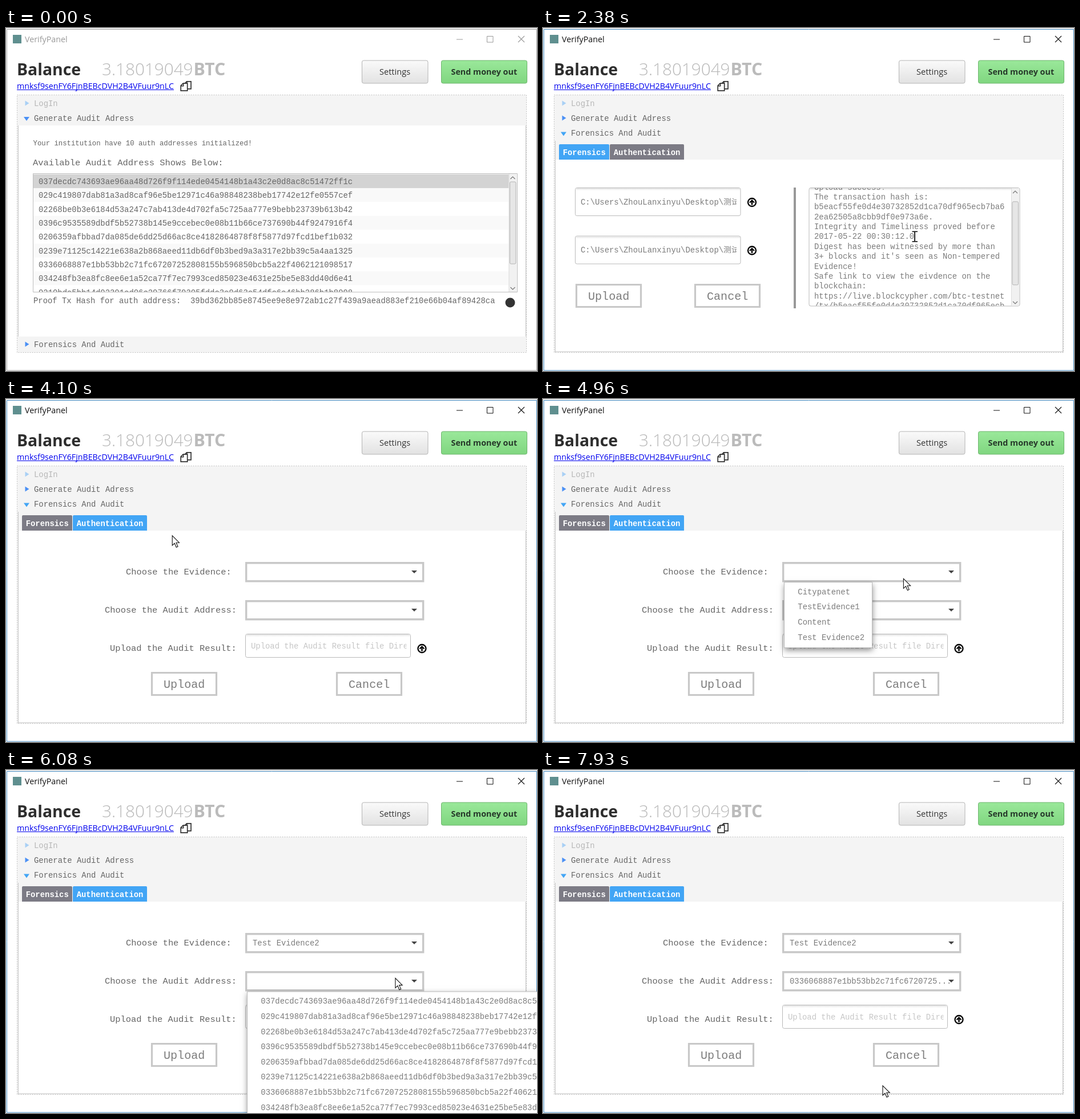
These frames come from a looping animation (930 px wide and 602 px high, 8000 ms). An HTML page with a canvas:

```html
<!DOCTYPE html>
<html lang="en">
<head>
<meta charset="utf-8">
<title>Wallet audit demo</title>
<style>
  html, body { margin: 0; width: 100%; height: 100%; overflow: hidden; background: #fff; }
  canvas { display: block; }
</style>
</head>
<body>
<canvas id="stage" width="930" height="602"></canvas>
<script>
const ctx = document.getElementById('stage').getContext('2d');
const LOOP = 8000;
const MONO = '"Liberation Mono", monospace';
const SANS = '"Open Sans", "Noto Sans", sans-serif';
const BLUE = '#42a5f5', ACCENT = '#0096c9', GREY = '#c8c8c8';
const INK = '#666', SOFT = '#7c7c7c', HINT = '#c6c6c6';
const PATH = 'C:\\Users\\ZhouLanxinyu\\Desktop\\测试文件';
const ADDRESSES = [
  '037decdc743693ae96aa48d726f9f114ede0454148b1a43c2e0d8ac8c51472ff1c',
  '029c419807dab81a3ad8caf96e5be12971c46a98848238beb17742e12fe0557cef',
  '02268be0b3e6184d53a247c7ab413de4d702fa5c725aa777e9bebb23739b613b42',
  '0396c9535589dbdf5b52738b145e9ccebec0e08b11b66ce737690b44f9247916f4',
  '0206359afbbad7da085de6dd25d66ac8ce4182864878f8f5877d97fcd1bef1b032',
  '0239e71125c14221e638a2b868aeed11db6df0b3bed9a3a317e2bb39c5a4aa1325',
  '0336068887e1bb53bb2c71fc67207252808155b596850bcb5a22f4062121098517',
  '034248fb3ea8fc8ee6e1a52ca77f7ec7993ced85023e4631e25be5e83dd40d6e41',
  '0210bda5bb14d02301cd06c29766f79305fddc3e9d63c54dfc6c46bb286b1b8998'
];
const EVIDENCE = ['Citypatenet', 'TestEvidence1', 'Content', 'Test Evidence2'];
const RESULT = [
  'Upload success!', 'The transaction hash is:',
  'b5eacf55fe0d4e30732852d1ca70df965ecb7ba6', '2ea62505a8cbb9df0e973a6e.',
  'Integrity and Timeliness proved before', '2017-05-22 00:30:12.0',
  'Digest has been witnessed by more than', "3+ blocks and it's seen as Non-tempered", 'Evidence!',
  'Safe link to view the eivdence on the', 'blockchain:',
  'https://live.blockcypher.com/btc-testnet', '/tx/b5eacf55fe0d4e30732852d1ca70df965ecb',
  '7ba62ea62505a8cbb9df0e973a6e'
];

// Event times in ms
const T = {
  focus: 100, expand: 320, expanded: 760, upload: 1560, scroll: 2230, scrolled: 2690,
  authTab: 3760, openEvidence: 4650, pickEvidence: 5450, openAddress: 6040, pickAddress: 7690
};
// Cursor path: time, x, y
const CURSOR = [
  [100, 120, 596], [300, 96, 556], [430, 94, 556], [870, 100, 476], [1390, 119, 465], [1560, 119, 465],
  [1740, 382, 462], [2070, 694, 388], [2290, 651, 366], [2900, 651, 366], [3110, 460, 416],
  [3320, 200, 398], [3440, 200, 398], [3720, 178, 222], [3980, 178, 222], [4540, 702, 305], [4660, 690, 304],
  [4760, 637, 307], [4960, 632, 315], [5080, 560, 362], [5330, 530, 417], [5450, 530, 417],
  [5960, 690, 367], [6080, 682, 365], [6750, 630, 612], [7180, 610, 612], [7470, 597, 566],
  [7650, 597, 566], [7930, 595, 554], [8000, 595, 554]
];

const clamp = v => Math.max(0, Math.min(1, v));
const progress = (t, a, b) => clamp((t - a) / (b - a));
const ease = p => p * p * (3 - 2 * p);

function cursorAt(t) {
  const i = CURSOR.findIndex(k => k[0] > t);
  if (i < 1) return { x: -50, y: -50 };
  const [t0, x0, y0] = CURSOR[i - 1], [t1, x1, y1] = CURSOR[i];
  const p = progress(t, t0, t1);
  return { x: x0 + (x1 - x0) * p, y: y0 + (y1 - y0) * p };
}

function text(str, x, y, size = 13.9, color = INK, weight = 400, family = MONO) {
  ctx.font = `${weight} ${size}px ${family}`;
  ctx.fillStyle = color;
  ctx.fillText(str, x, y);
}

function fill(x, y, w, h, color) {
  ctx.fillStyle = color;
  ctx.fillRect(x, y, w, h);
}

function box(x, y, w, h, radius, paint, stroke, width = 1) {
  ctx.beginPath();
  ctx.roundRect(x, y, w, h, radius);
  if (paint) { ctx.fillStyle = paint; ctx.fill(); }
  if (stroke) { ctx.strokeStyle = stroke; ctx.lineWidth = width; ctx.stroke(); }
}

function shape(points, paint, stroke, width = 1, closed = true) {
  ctx.beginPath();
  points.forEach(([x, y]) => ctx.lineTo(x, y));
  if (closed) ctx.closePath();
  if (paint) { ctx.fillStyle = paint; ctx.fill(); }
  if (stroke) { ctx.strokeStyle = stroke; ctx.lineWidth = width; ctx.stroke(); }
}

function clipped(x, y, w, h, draw) {
  ctx.save();
  ctx.beginPath();
  ctx.rect(x, y, w, h);
  ctx.clip();
  draw();
  ctx.restore();
}

function gradient(y0, y1, from, to) {
  const g = ctx.createLinearGradient(0, y0, 0, y1);
  g.addColorStop(0, from);
  g.addColorStop(1, to);
  return g;
}

function field(x, y, w, h) {
  box(x, y, w, h, 3, '#fff', '#bababa');
  fill(x + 1, y + .5, w - 2, 4, gradient(y, y + 5, '#dedede', '#ffffff'));
}

function textField(y, w, str, x = 56.5, h = 49, color = SOFT) {
  field(x, y, w, h);
  clipped(x + 8, y, w - 15, h, () => text(str, x + 9.5, y + h / 2 + 4.5, 13.9, color));
}

function button(label, x, y) {
  box(x + 1.5, y + 1.5, 113, 39, 0, '#fff', GREY, 3.2);
  text(label, x + 22, y + 28, 20.1, SOFT);
}

function combo(y, value) {
  box(420.7, y + 1.7, 310, 32, 0, '#fff', GREY, 3.4);
  text(value, 432, y + 22, 13.9, SOFT);
  shape([[710, y + 15], [720, y + 15], [715, y + 20]], '#444');
}

function uploadIcon(x, y) {
  ctx.beginPath();
  ctx.arc(x, y, 7, 0, Math.PI * 2);
  ctx.strokeStyle = '#000';
  ctx.lineWidth = 2.3;
  ctx.stroke();
  shape([[x - 4, y + .5], [x, y - 3.5], [x + 4, y + .5]], null, '#000', 2.2, false);
  shape([[x, y - 3], [x, y + 4.5]], null, '#000', 2.5, false);
}

function scrollbar(x, top, bottom, thumbTop, thumbBottom) {
  fill(x - 7, top, 14, bottom - top, '#f1f1f1');
  fill(x - 7, top, 1, bottom - top, '#dcdcdc');
  const arrow = (y, d) => shape([[x - 4, y + d], [x, y - d], [x + 4, y + d]], null, '#777', 1.2, false);
  arrow(top + 7, 2);
  arrow(bottom - 6, -2);
  box(x - 5, thumbTop, 10.5, thumbBottom - thumbTop, 2, '#e6e6e6', '#b4b4b4');
}

function popup(items, x, y, w, h, mouse) {
  ctx.save();
  ctx.shadowColor = 'rgba(0,0,0,.45)';
  ctx.shadowBlur = 10;
  ctx.shadowOffsetY = 4;
  box(x + .5, y + .5, w, h, 0, '#fff');
  ctx.restore();
  box(x + .5, y + .5, w, h, 0, null, '#b8b8b8');
  items.forEach((item, i) => {
    const top = y + 4 + i * 26.63;
    const hover = mouse.x > x && mouse.x < x + w && mouse.y >= top && mouse.y < top + 26.63;
    if (hover) fill(x + 1, top, w - 1, 26.63, ACCENT);
    text(item, x + 24.3, top + 17.8, 13.9, hover ? '#fff' : SOFT);
  });
}

function windowFrame(active) {
  fill(0, 0, 930, 602, '#fff');
  fill(0, 0, 930, 2, '#ececec');
  box(1.5, 2.5, 928, 598.5, 0, '#fff', active ? '#4a90c6' : '#a5a5a5');
  const ink = active ? '#111' : '#999';
  fill(12, 12, 15, 15, '#5f8f8f');
  text('VerifyPanel', 33, 24.5, 14.3, ink, 400, SANS);
  fill(789, 19.5, 11, 1, ink);
  box(842.5, 14.5, 10.5, 10.5, 0, null, ink);
  shape([[897, 14], [908, 25]], null, ink, 1.1, false);
  shape([[908, 14], [897, 25]], null, ink, 1.1, false);
}

function copyIcon() {
  const page = (x, y) => {
    shape([[x + 4, y], [x + 11.5, y], [x + 11.5, y + 13], [x, y + 13], [x, y + 4]], '#fff', '#333', 1.7);
    shape([[x + 4.5, y], [x + 4.5, y + 4.5], [x, y + 4.5]], null, '#333', 1.5, false);
  };
  page(312.5, 93.8);
  page(306.2, 97.2);
}

function header() {
  text('Balance', 19, 83, 28.4, '#2e2e2e', 700, SANS);
  text('3.18019049', 168, 83, 29.7, '#b8b8b8', 300, SANS);
  text('BTC', 328.5, 83, 30.3, '#bbb', 700, SANS);
  text('mnksf9senFY6FjnBEBcDVH2B4VFuur9nLC', 19, 106.5, 14.2, '#0000ee', 400, SANS);
  fill(19, 108, 275, 1, '#0000ee');
  copyIcon();
  box(623.5, 57, 115.5, 40, 3, gradient(57, 97, '#fafafa', '#e2e2e2'), '#b4b4b4');
  text('Settings', 654, 82, 14.6, '#333', 400, SANS);
  box(762.5, 57, 150, 40, 3, gradient(57, 97, '#9ae89a', '#80d680'), '#6fb56f');
  text('Send money out', 779.5, 82, 14.35, '#26382a', 700, SANS);
}

function sectionTitle(label, y, open, color = INK, arrow = '#4a90f5', glow = false) {
  text(label, 49, y + 4.5, 13.9, color);
  ctx.save();
  if (glow) { ctx.shadowColor = '#1e90ff'; ctx.shadowBlur = 7; }
  shape(open ? [[31, y - 2], [41, y - 2], [36, y + 5]] : [[33.5, y - 4.5], [40.5, y], [33.5, y + 4.5]], arrow);
  ctx.restore();
}

function addressPage() {
  fill(21, 171, 890, 371, '#fff');
  text('Your institution have 10 auth addresses initialized!', 47.5, 205.5, 12.3);
  text('Available Audit Address Shows Below:', 47, 241, 15.45);
  clipped(47, 255, 849, 209, () => {
    ADDRESSES.forEach((address, i) => {
      const top = 256.8 + i * 24.35;
      fill(48, top, 833, 24.35, i === 0 ? '#d3d3d3' : i % 2 ? '#f9f9f9' : '#fff');
      text(address, 57, top + 17);
    });
  });
  scrollbar(887.5, 256, 463, 270, 414);
  box(47.5, 255.5, 848, 208, 0, null, '#bdbdbd');
  text('Proof Tx Hash for auth address:', 48, 483);
  text('39bd362bb85e8745ee9e8e972ab1c27f439a9aead883ef210e66b04af89428ca', 323, 483);
  ctx.beginPath();
  ctx.arc(883, 482, 8.5, 0, Math.PI * 2);
  ctx.fillStyle = '#333';
  ctx.fill();
}

function tab(label, x, w, selected) {
  box(x, 204, w, 27, [2, 2, 0, 0], selected ? BLUE : '#7c7b85');
  text(label, x + 6.7, 222.6, 13.9, '#fff', 700);
}

function forensicsPage(t) {
  textField(280.5, 289.5, PATH);
  uploadIcon(366, 306);
  textField(365, 289.5, PATH);
  uploadIcon(366, 390.5);
  button('Upload', 57, 449);
  button('Cancel', 265, 449);
  fill(439, 280, 4, 212, '#999');
  field(466, 280.5, 369, 207.5);
  if (t < T.upload) return text('The result will be shown here!', 475, 298, 13.9, HINT);
  const scroll = progress(t, T.scroll, T.scrolled);
  clipped(467, 281, 367, 206.5, () => {
    RESULT.forEach((line, i) => text(line, 475, 298 + i * 17.36 - scroll * 43.8, 13.9, SOFT));
    scrollbar(827, 281, 488, 294 + scroll * 33, 440 + scroll * 33);
  });
}

function authenticationPage(t) {
  text('Choose the Evidence:', 210, 308, 15.4);
  text('Choose the Audit Address:', 173, 375, 15.4);
  text('Upload the Audit Result:', 182, 442, 15.4);
  combo(286, t < T.pickEvidence ? '' : EVIDENCE[3]);
  combo(353, t < T.pickAddress ? '' : ADDRESSES[6].slice(0, 31) + '...');
  textField(412.5, 289, 'Upload the Audit Result file Directory', 419.5, 41, HINT);
  uploadIcon(728.5, 438);
  button('Upload', 254, 479);
  button('Cancel', 578, 479);
}

function accordion(t) {
  const shift = 370.5 * (1 - ease(progress(t, T.expand, T.expanded)));
  const opening = t >= T.expand;
  fill(20, 118, 891, 451, '#f4f4f4');
  sectionTitle('LogIn', 132, false, '#b8b8b8', '#a9d0f5');
  sectionTitle('Generate Audit Adress', 158, !opening);
  if (shift > 0) clipped(20, 171, 892, shift, addressPage);
  sectionTitle('Forensics And Audit', 184.5 + shift, opening, INK, opening ? BLUE : '#4a90f5', opening && t < T.upload);

  clipped(20, 198 + shift, 892, Math.max(0, 371 - shift), () => {
    ctx.translate(0, shift);
    const auth = t >= T.authTab;
    fill(21, 231, 890, 340, '#fff');
    tab('Forensics', 28, 88, !auth);
    tab('Authentication', 117, 130, auth);
    (auth ? authenticationPage : forensicsPage)(t);
  });

  fill(21, shift > 0 ? 171 : 198, 1, shift > 0 ? shift : 371, '#c4c4c4');
  fill(910, shift > 0 ? 171 : 231, 1, shift > 0 ? shift : 338, '#c4c4c4');
  if (shift === 0) fill(21, 567.5, 890, 1, '#c4c4c4');
  ctx.setLineDash([2, 2]);
  box(19.5, 117.5, 892, 452, 0, null, '#bcbcbc');
  ctx.setLineDash([]);
}

function drawCursor(t, { x, y }) {
  const within = (l, top, r, b) => x > l && x < r && y > top && y < b;
  const overText = t > T.expanded && t < T.authTab &&
    (within(57, 281, 346, 329) || within(57, 365, 346, 414) || within(467, 281, 820, 488));
  if (overText) {
    fill(x - .8, y - 9, 1.8, 18, '#111');
    for (const end of [-9.5, 8]) fill(x - 4.5, y + end, 9.5, 1.6, '#111');
    return;
  }
  const outline = [[0, 0], [0, 17], [4, 13.3], [7, 20.3], [9.8, 19], [6.8, 12.3], [12.2, 12.3]];
  shape(outline.map(([dx, dy]) => [x + dx, y + dy]), '#fff', '#111', 1.1);
}

function draw(t) {
  const mouse = cursorAt(t);
  windowFrame(t >= T.focus);
  header();
  accordion(t);
  if (t >= T.openEvidence && t < T.pickEvidence) popup(EVIDENCE, 422, 321, 154, 115, mouse);
  if (t >= T.openAddress && t < T.pickAddress) popup(ADDRESSES, 422, 388.5, 600, 300, mouse);
  drawCursor(t, mouse);
}

const start = performance.now();
function frame() {
  draw((performance.now() - start) % LOOP);
  requestAnimationFrame(frame);
}
frame();
</script>
</body>
</html>
```
